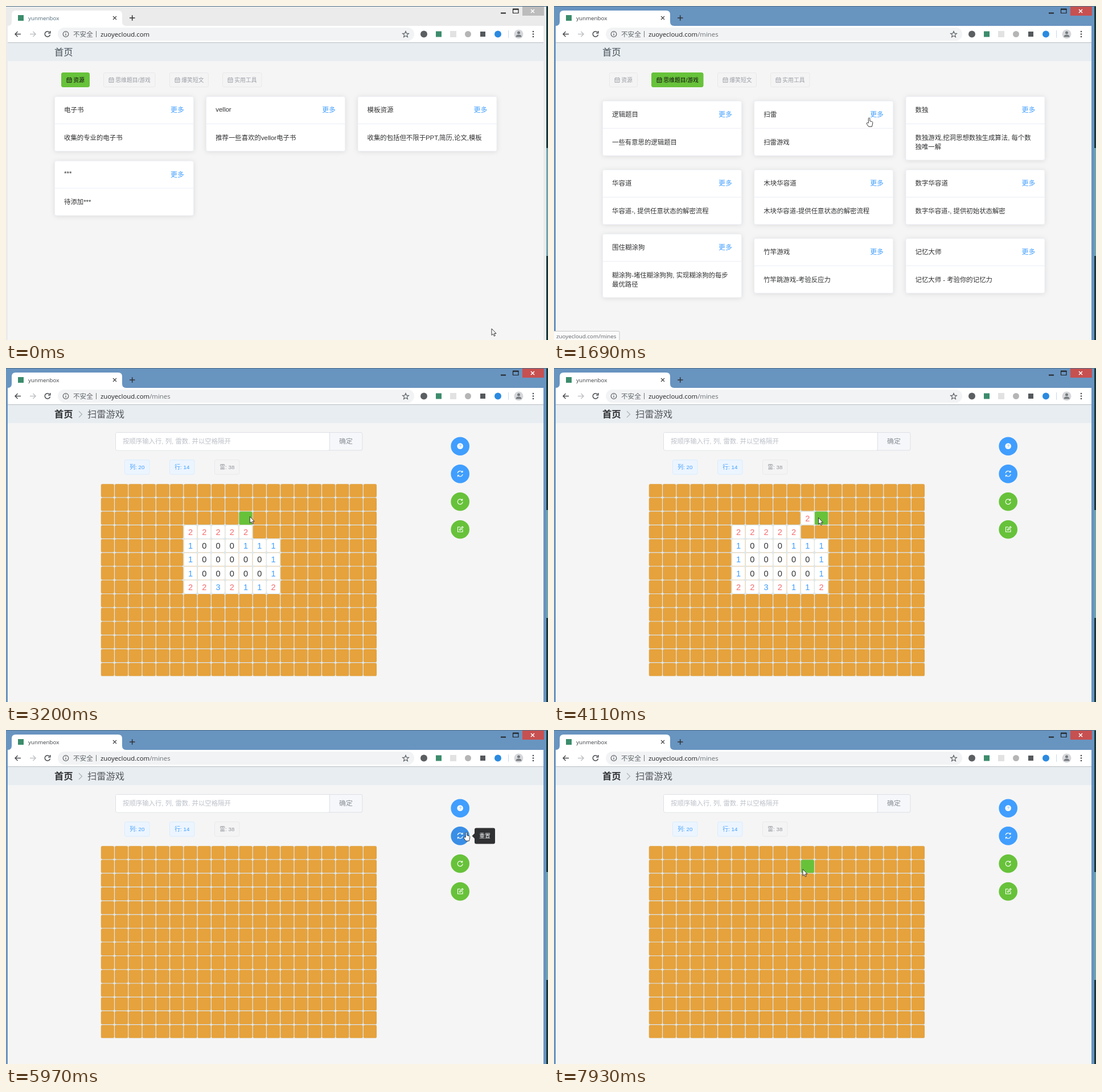
These frames come from a looping animation (952 px wide and 588 px high, 8000 ms). An HTML page:

```html
<!DOCTYPE html>
<html lang="zh-CN">
<head>
<meta charset="utf-8">
<title>yunmenbox</title>
<style>
html, body { margin: 0; width: 100%; height: 100%; overflow: hidden; background: #f5f5f5; }
svg { display: block; width: 952px; height: 588px; cursor: default; }
text { font-family: "Liberation Sans", "Noto Sans CJK SC", "Noto Sans CJK", sans-serif; white-space: pre; }
.ui { font-family: "Open Sans", "Noto Sans CJK SC", "Noto Sans CJK", sans-serif; }
.card { filter: drop-shadow(0 1.6px 4.5px rgba(0,0,0,.1)); }
</style>
</head>
<body>
<svg id="stage" viewBox="0 0 952 588"></svg>
<script>
const LOOP = 8000;
const BLUE = '#409eff', GREEN = '#67c23a', ORANGE = '#e6a23c', RED = '#f56c6c';
const stage = document.getElementById('stage');
let parent = stage;

function el(tag, attrs, content) {
  const node = document.createElementNS('http://www.w3.org/2000/svg', tag);
  for (const key in attrs) node.setAttribute(key, attrs[key]);
  if (content !== undefined) node.textContent = content;
  parent.appendChild(node);
  return node;
}
const rect = (x, y, width, height, fill, more) => el('rect', { x, y, width, height, fill, ...more });
const circle = (cx, cy, r, fill, more) => el('circle', { cx, cy, r, fill, ...more });
const line = (d, stroke, width = 1.3, more) =>
  el('path', { d, stroke, 'stroke-width': width, fill: 'none', ...more });
// y is the visual middle of the line of text
const text = (x, y, str, size, fill, more) =>
  el('text', { x, y: y + size * .36, 'font-size': size, fill, ...more }, str);
const middle = { 'text-anchor': 'middle' };

function group(build) {
  const outer = parent, g = el('g', {});
  parent = g;
  build();
  parent = outer;
  return g;
}
const show = (node, on) => node.setAttribute('visibility', on ? 'inherit' : 'hidden');

// ---------- browser window ----------
rect(0, 0, 952, 588, '#17383c');
rect(949, 250, 3, 190, '#6fa3ad');
const frame = rect(0, 0, 949, 588, '#6894c0');
rect(0, 0, 952, 1, '#4d7089');
const closeBox = rect(907, 1, 38, 16, '#c75050');
line('M922 6l6 6M928 6l-6 6', '#fff', 1.5);
line('M869 12.5h9', '#222', 2);
line('M890.5 6h9.5v6.5h-9.5z', '#222', 1.2);
line('M890 5.5h10.5', '#222', 2);

el('path', { d: 'M3 35Q10 35 10 28V15Q10 8 17 8H197Q204 8 204 15V28Q204 35 211 35Z', fill: '#fff' });
rect(21, 16, 10, 10, '#3c8c6c');
const tabTitle = text(39, 21.5, 'yunmenbox', 9.8, '#3c4043', { class: 'ui' });
line('M188 18l6 6M194 18l-6 6', '#444', 1.2);
line('M217 21h9.500M221.700 16.200v9.500', '#333', 1.5);

rect(3, 35, 941, 30, '#fff');
rect(3, 64, 941, 1, '#b9bdc2');
line('M26 49.500H16M20.500 45l-4.500 4.500 4.500 4.500', '#4a4d51', 1.5);
line('M42 49.500h10M47.500 45l4.500 4.500-4.500 4.500', '#c0c2c5', 1.5);
line('M76.500 46.300A4.700 4.700 0 1 0 77.500 50.500M77.800 44v3.700h-3.700', '#4a4d51', 1.5);
rect(91, 38, 626, 23, '#f1f3f4', { rx: 11.500 });
circle(105, 49.500, 4.800, 'none', { stroke: '#5f6368', 'stroke-width': 1.200 });
line('M105 49v3M105 46.500v1.300', '#5f6368');
text(118, 49.500, '不安全', 11.6, '#5f6368', { class: 'ui' });
line('M158.500 44v11', '#777', 1);
const address = text(166, 49.5, '', 11.4, '#202124', { class: 'ui' });
address.innerHTML = 'zuoyecloud.com<tspan fill="#6a6e73">/mines</tspan>';
const addressPath = address.querySelector('tspan');
line('M702 44.500l1.500 3.600 3.900.3-3 2.500 1 3.800-3.400-2.100-3.400 2.100 1-3.800-3-2.500 3.900-.3z', '#5f6368', 1.2);
circle(734, 49.500, 6, '#5c5f62');
rect(755, 44.500, 10, 10, '#3c8c6c');
rect(780, 44, 11, 11, '#e2e2e2');
circle(811.500, 49.500, 5.500, '#b5b5b5');
rect(833, 45, 9, 9, '#55585c');
circle(864, 49.500, 6, '#2b8ae0');
line('M882.500 43v13', '#c5d8f0', 1);
circle(900.500, 49.500, 8, '#d5d7da');
circle(900.500, 47, 2.500, '#777b80');
el('path', { d: 'M895.500 54.500q0-4 5-4t5 4z', fill: '#777b80' });
[45, 49.500, 54].forEach(y => circle(926, y, 1.300, '#4a4d51'));

rect(3, 65, 941, 523, '#f5f5f5');
rect(3, 65, 941, 32, '#e8edf1');

// ---------- card pages ----------
const TABS = [['资源', 97.5, 49], ['思维题目/游戏', 171.5, 90.5], ['爆笑短文', 287.5, 68], ['实用工具', 380.5, 68.5]];
const COLUMNS = [85.5, 351.7, 618];

function tabs(active) {
  TABS.forEach(([label, x, w], i) => {
    const on = i === active, ink = on ? '#111' : '#9a9da3';
    rect(x, 117.5, w, 25, on ? GREEN : '#f4f4f5', { rx: 2.500, stroke: on ? GREEN : '#e9e9eb' });
    line(`M${x + 9.5} 127h8v7.500h-8zM${x + 9.5} 129.500h8M${x + 11.5} 125.500v2M${x + 15.5} 125.500v2M${x + 11} 132h5`, ink, .9);
    text(x + 20.800, 130.3, label, 9.8, ink);
  });
}

function card(column, y, title, ...body) {
  const x = COLUMNS[column], h = 80.5 + 15.600 * body.length;
  rect(x, y, 244, h, '#fff', { rx: 3, class: 'card', stroke: '#ebeef5', 'stroke-width': .8 });
  line(`M${x} ${y + 48}h244`, '#ebeef5', 1);
  text(x + 16.5, y + (/^[\x00-\x7f]/.test(title) ? 22 : 23.500), title, 11.5, '#303133');
  text(x + 203.5, y + 23.500, '更多', 11.9, BLUE);
  body.forEach((str, i) => text(x + 16.5, y + 72.5 + 15.700 * i, str, 11.4, '#303133'));
}

const cardHome = group(() => text(85, 81.500, '首页', 16.3, '#465058'));

const resources = group(() => {
  tabs(0);
  card(0, 159.5, '电子书', '收集的专业的电子书');
  card(1, 159.5, 'vellor', '推荐一些喜欢的vellor电子书');
  card(2, 159.5, '模板资源', '收集的包括但不限于PPT,简历,论文,模板');
  card(0, 272.8, '***', '待添加***');
});

const games = group(() => {
  tabs(1);
  card(0, 167.3, '逻辑题目', '一些有意思的逻辑题目');
  card(1, 167.3, '扫雷', '扫雷游戏');
  card(2, 159.5, '数独', '数独游戏,挖洞思想数独生成算法, 每个数', '独唯一解');
  card(0, 288.5, '华容道', '华容道-, 提供任意状态的解密流程');
  card(1, 288.5, '木块华容道', '木块华容道-提供任意状态的解密流程');
  card(2, 288.5, '数字华容道', '数字华容道-, 提供初始状态解密');
  card(0, 401.5, '围住糊涂狗', '糊涂狗-堵住糊涂狗狗, 实现糊涂狗的每步', '最优路径');
  card(1, 409.3, '竹竿游戏', '竹竿跳游戏-考验反应力');
  card(2, 409.3, '记忆大师', '记忆大师 - 考验你的记忆力');
});

const statusBar = group(() => {
  rect(-3, 572.5, 118, 20, '#fbfbfb', { rx: 2, stroke: '#c4c4c4' });
  text(4, 581, 'zuoyecloud.com/mines', 9.8, '#5f6368', { class: 'ui' });
});

// ---------- minesweeper page ----------
const GRID = { x: 166.8, y: 204.3, dx: 24.27, dy: 24.22, cols: 20, rows: 14 };
const OPEN_ROWS = { 3: '22222', 4: '1000111', 5: '1000001', 6: '1000001', 7: '2232112' };
const FIRST_COL = 6, EXTRA = { col: 11, row: 2 };
const BUTTON_X = 797.7, BUTTONS = [[137.7, BLUE], [186.4, BLUE], [235.3, GREEN], [284.2, GREEN]];
const buttonNodes = [];
let hoverCell, openArea, extraCell;

const cell = (col, row, fill) =>
  rect(GRID.x + col * GRID.dx, GRID.y + row * GRID.dy, 23.1, 23.1, fill, { rx: 2.600 });

function openCell(col, row, digit) {
  cell(col, row, '#fff');
  text(GRID.x + col * GRID.dx + 11.6, GRID.y + row * GRID.dy + 11.8, digit, 14.6,
    { 0: '#303133', 2: RED }[digit] || BLUE, middle);
}

function tag(x, str, ink, fill, stroke) {
  rect(x, 161.800, 43.5, 25.400, fill, { rx: 3, stroke });
  text(x + 21.800, 174.500, str, 9.8, ink, middle);
}

const game = group(() => {
  text(85, 81.500, '首页', 16.3, '#303133', { 'font-weight': 700 });
  line('M128 76l5.500 5.500-5.500 5.500', '#a9afb8', 1.1);
  text(143, 81.500, '扫雷游戏', 16.3, '#55595f');

  rect(192.5, 113.5, 433.5, 31.500, '#f5f7fa', { rx: 3, stroke: '#dcdfe6' });
  rect(193, 114, 375, 30.500, '#fff', { rx: 2.500 });
  line('M568.5 114v31', '#dcdfe6', 1);
  text(205, 129.300, '按顺序输入行, 列, 雷数. 并以空格隔开', 11.4, '#bcc0c8');
  text(597, 128.500, '确定', 11.9, '#8b9097', middle);
  tag(208.5, '列: 20', BLUE, '#ecf5ff', '#d9ecff');
  tag(287.5, '行: 14', BLUE, '#ecf5ff', '#d9ecff');
  tag(366.5, '雷: 38', '#909399', '#f4f4f5', '#e9e9eb');

  rect(GRID.x, GRID.y, GRID.cols * GRID.dx - 1, GRID.rows * GRID.dy - 1, '#d9e9f6', { rx: 2 });
  for (let row = 0; row < GRID.rows; row++)
    for (let col = 0; col < GRID.cols; col++) cell(col, row, ORANGE);
  openArea = group(() => {
    for (const row in OPEN_ROWS)
      [...OPEN_ROWS[row]].forEach((digit, i) => openCell(FIRST_COL + i, +row, digit));
  });
  extraCell = group(() => openCell(EXTRA.col, EXTRA.row, '2'));
  hoverCell = cell(0, 0, GREEN);

  BUTTONS.forEach(([y, fill]) => buttonNodes.push(circle(BUTTON_X, y, 16.3, fill)));
  circle(BUTTON_X, 137.5, 5.300, '#fff');
  text(BUTTON_X, 137.5, '?', 8, BLUE, middle);
  line('M793.2 185.200a4.600 4.600 0 0 1 8.300-2M802.2 187a4.600 4.600 0 0 1-8.300 2M802 180.800v2.700h-2.700M793.4 191.500v-2.700h2.700', '#fff', 1.1);
  line('M801 232.300a4.500 4.500 0 1 0 1.200 3.200M801.7 230.200v2.700h-2.700', '#fff', 1.1);
  line('M798 280h-4.500v8.500h8.500v-4.500M796.5 285.500l.4-1.800 4.600-4.600 1.500 1.500-4.600 4.600z', '#fff', 1.1);
});

const tooltip = group(() => {
  el('path', { d: 'M818.500 0l5-5v10z', fill: '#303133' });
  rect(823, -14, 36, 28, '#303133', { rx: 3 });
});
parent = tooltip;
const tooltipText = text(841, 0, '', 9.8, '#fff', { ...middle, 'font-weight': 500 });
parent = stage;

// ---------- pointer ----------
const outline = { fill: '#fff', stroke: '#222', 'stroke-width': .9, 'stroke-linejoin': 'round' };
const arrow = el('path', { d: 'M0 0V11.500L2.600 9.200 4.400 13.200 6.200 12.400 4.500 8.500H8Z', ...outline });
const hand = el('path', { d: 'M-1.300 9V1.300a1.300 1.300 0 0 1 2.600 0V5.600L5 6.500Q6.500 7 6.300 8.600L5.600 12.500 4.800 15.300H-1L-4.300 10.500Q-5 8.500-3 8.600Z', ...outline });

// time, x, y of the pointer tip
const PATH = [
  [70, 853, 568], [530, 219, 127], [840, 219, 127], [1310, 574, 216], [1400, 574, 216],
  [1480, 562, 194], [1620, 554, 197], [1700, 553.5, 197], [1890, 361.5, 303],
  [2180, 361.5, 303], [2550, 418, 290], [2880, 436, 258], [3030, 438, 260], [3150, 438, 260],
  [3350, 400, 266], [3570, 424, 270], [3770, 424, 270], [3900, 441, 266], [3980, 442, 266],
  [4100, 464.5, 263.5], [4300, 464.5, 263.5], [4500, 466, 268], [4800, 468, 250], [5120, 462, 238],
  [5270, 461, 236], [5420, 461, 234], [5550, 461, 234], [5800, 800, 190], [5900, 808.5, 180],
  [6060, 808.5, 180], [6360, 799, 142], [6600, 797, 138], [6760, 797, 138],
  [7130, 452, 258], [7220, 446, 254], [7450, 420, 262], [7700, 428, 250], [7930, 437, 245]
];

function pointerAt(t) {
  const next = PATH.findIndex(p => p[0] > t);
  if (next < 0) return PATH[PATH.length - 1].slice(1);
  if (next === 0) return PATH[0].slice(1);
  const [t0, x0, y0] = PATH[next - 1], [t1, x1, y1] = PATH[next];
  const k = (t - t0) / (t1 - t0);
  return [x0 + (x1 - x0) * k, y0 + (y1 - y0) * k];
}

const between = (v, from, to) => v >= from && v < to;

function render(t) {
  const [x, y] = pointerAt(t);
  const focused = t >= 600, inGame = t >= 1760;
  const opened = between(t, 2125, 5900), extraOpen = between(t, 3950, 5900);

  frame.setAttribute('fill', focused ? '#6894c0' : '#ebebeb');
  closeBox.setAttribute('fill', focused ? '#c75050' : '#bcbcbc');
  tabTitle.setAttribute('fill', focused ? '#3c4043' : '#4d6a78');
  show(addressPath, t >= 1610);
  show(cardHome, !inGame);
  show(resources, !focused);
  show(games, focused && !inGame);
  show(statusBar, between(t, 1460, 1760));
  show(game, inGame);
  show(openArea, opened);
  show(extraCell, extraOpen);
  if (!inGame) [openArea, extraCell].forEach(node => show(node, false));

  const col = Math.floor((x - GRID.x) / GRID.dx), row = Math.floor((y - GRID.y) / GRID.dy);
  const inOpenArea = opened && OPEN_ROWS[row] && between(col - FIRST_COL, 0, OPEN_ROWS[row].length);
  const inExtra = extraOpen && col === EXTRA.col && row === EXTRA.row;
  const hovering = between(col, 0, GRID.cols) && between(row, 0, GRID.rows);
  show(hoverCell, inGame && hovering && !inOpenArea && !inExtra);
  hoverCell.setAttribute('x', GRID.x + col * GRID.dx);
  hoverCell.setAttribute('y', GRID.y + row * GRID.dy);

  const button = inGame ? BUTTONS.findIndex(b => Math.hypot(x - BUTTON_X, y - b[0]) < 16.3) : -1;
  const pressed = between(t, 5880, 6060) ? 1 : between(t, 6600, 6760) ? 0 : -1;
  const focus = between(t, 6060, 6600) ? 1 : between(t, 6760, 7400) ? 0 : -1;
  buttonNodes.forEach((node, i) => node.setAttribute('fill',
    i === pressed ? '#3a8ee6' : i < 2 && (i === button || i === focus) ? '#66b1ff' : BUTTONS[i][1]));
  const tip = ['标记', '重置'][button];
  show(tooltip, Boolean(tip));
  if (tip) {
    tooltip.setAttribute('transform', `translate(0 ${BUTTONS[button][0]})`);
    tooltipText.textContent = tip;
  }

  const onTab = !inGame && between(y, 117, 143) && TABS.some(([, left, w]) => between(x, left, left + w));
  const onLink = !inGame && focused && between(x, 552, 582) && between(y, 182, 200);
  const isHand = onTab || onLink || button >= 0;
  show(hand, isHand);
  show(arrow, !isHand);
  (isHand ? hand : arrow).setAttribute('transform', `translate(${x} ${y})`);
}

function tick() {
  render(performance.now() % LOOP);
  requestAnimationFrame(tick);
}
tick();
</script>
</body>
</html>
```
